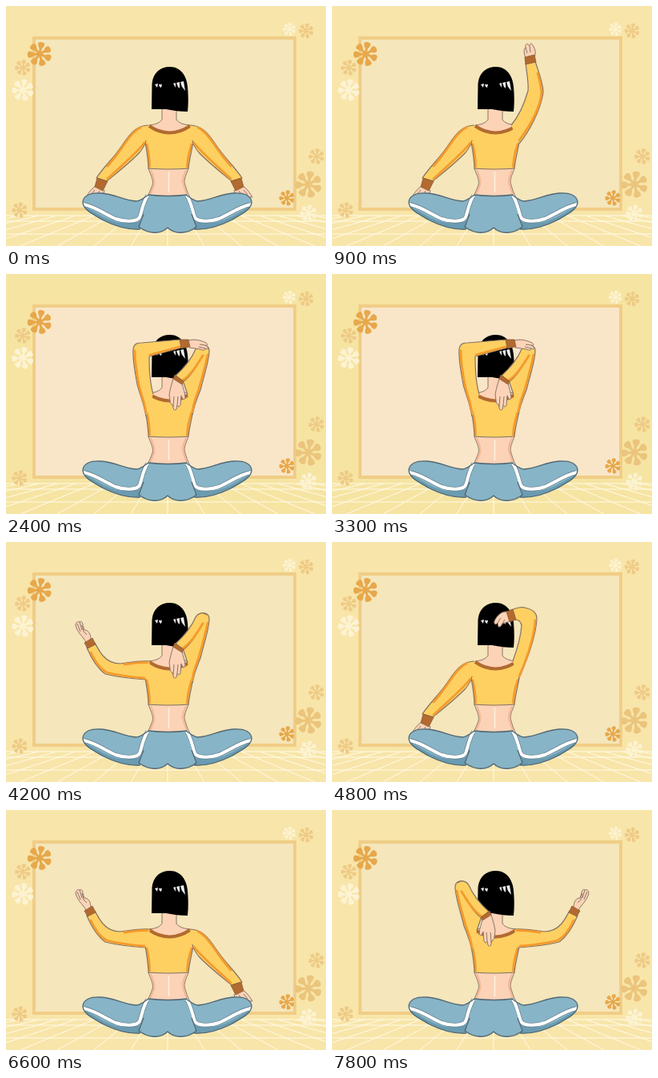
An HTML page for the animation above (8000 ms loop, 400 px wide and 300 px high).

```html
<!DOCTYPE html>
<html lang="en">
<head>
<meta charset="utf-8">
<title>Shoulder stretch</title>
<style>
  html, body { margin: 0; width: 100%; height: 100%; overflow: hidden; background: #f8e5a9; }
  svg { display: block; width: 100%; height: 100%; }
  path { stroke-linejoin: round; }
  .wall { fill: #f8e5a9; }
  .panel { fill: #f5e6bb; stroke: #f0cd86; stroke-width: 4; }
  .warm .wall { fill: #f6e4a2; }
  .warm .panel { fill: #f9e6c8; }
  .floor { fill: none; stroke: #fffbe9; stroke-width: 1; }
  .sleeve, .top { fill: #fdd061; }
  .sleeve, .edge { stroke: #857264; stroke-width: 1.2; }
  .edge, .shade, .line, .blush { fill: none; }
  .shade { stroke: #f59a2c; stroke-width: 2.8; stroke-linecap: round; }
  .cuff { fill: #b26a30; stroke: #8a5a38; stroke-width: .8; }
  .skin { fill: #fcd3b7; stroke: #8b7668; stroke-width: 1; }
  .line { stroke: #8b7668; stroke-width: 1; }
  .blush { stroke: #f3b796; stroke-width: 2; }
  .leg, .seat { fill: #87b4c6; }
  .under { fill: #6a9bb0; }
  .rim { fill: none; stroke: #526874; stroke-width: 1.3; }
  .hem { fill: none; stroke: #64808f; stroke-width: 5.4; }
  .stripe { fill: none; stroke: #fff; stroke-width: 4; }
</style>
</head>
<body>
<svg id="stage" viewBox="0 0 400 300" preserveAspectRatio="none">
  <defs>
    <path id="petal" d="M-1.300 0 L-1.600 -7 Q-5 -11 -3.800 -14 Q0 -16.500 3.800 -14 Q5 -11 1.600 -7 L1.300 0Z"/>
    <g id="flower"><circle r="3.500"/></g>

    <!-- Left arm poses; the right arm mirrors them -->
    <g id="down">
      <path class="skin" d="M112 225 C106 229 103 234 100 239 L121 239 L123 230"/>
      <path class="line" d="M111 230 L106 236 M117 231 L113 237"/>
      <path class="sleeve" d="M178 149 C164 149 156 158 146 173 C135 190 122 201 113 215 L126 219 C138 209 157 194 167 183 C171 178 174 173 175 168"/>
      <path class="shade" d="M168 152 C156 158 148 174 137 188 L127 200 M173 171 C163 184 145 199 127 216"/>
      <path class="cuff" d="M114 215 L127 219 L121 231 L111 226Z"/>
    </g>
    <g id="out">
      <path class="skin" d="M100 125 C96 118 89 113 87 104 C87 100 90 99 92 100 C94 98 96 101 96 104 L98 110 C103 110 106 115 106 122"/>
      <path class="line" d="M89 102 L93 112 M92 100 L95 110 M95 104 L97 112 L101 116"/>
      <path class="sleeve" d="M180 149 C166 148 152 151 143 152 C134 152 127 149 121 142 C116 136 114 131 111 126 L101 132 C106 144 113 157 124 165 C140 169 160 171 175 172"/>
      <path class="shade" d="M106 138 C112 151 118 159 126 163 C142 167 158 169 173 170 M177 150.500 Q162 150.500 148 153"/>
      <path class="cuff" d="M98 126 L108 120 L112 128 L102 133Z"/>
    </g>
    <g id="up">
      <path class="skin" d="M155 64 C152 57 155 53 157 49 C159 45 161 48 161 50 C164 45 167 48 166 52 C169 54 168 59 166 66"/>
      <path class="line" d="M161 50 L160 58 M166 52 L164 59"/>
      <path class="sleeve" d="M174 172 C162 158 147 130 144 108 C144 96 150 82 154 69 L166 72 C164 86 162 98 163 106 C167 120 174 137 184 149"/>
      <path class="shade" d="M174 168 C162 152 148 129 146 108 Q147 97 151 84"/>
      <path class="cuff" d="M153 70 L155 61 L167 64 L166 73Z"/>
    </g>
    <g id="bent">
      <path class="skin" d="M188 87 C196 86 202 92 205 99 C206 103 203 104 201 101 L200 106 Q197 107 195 102 L185 99"/>
      <path class="line" d="M201 101 L197 95 M195 102 L192 97"/>
      <path class="sleeve" d="M175 172 C163 145 153 115 152 96 C152 88 158 84 164 83 C170 80 176 82 184 85 L179 97 C175 97 172 100 171 104 C172 120 178 138 182 149"/>
      <path class="shade" d="M174 168 C163 142 155 115 154 98"/>
      <path class="cuff" d="M182 84 L190 87 L186 100 L178 97Z"/>
    </g>
    <g id="behind">
      <path class="sleeve" d="M175 176 C172 160 168 153 165 145 C160 125 154 108 154 96 C154 90 160 87 166 90 L188 130 L181 151"/>
      <path class="shade" d="M175 172 C173 158 169 151 167 144 Q160 120 156 101"/>
      <path class="skin" d="M188 136 C187 143 184 148 184 155 C185 158 187 157 189 152 L190 164 Q192 168 194 164 L195 169 Q198 172 199 167 L200 163 Q203 163 203 158 L204 151 C203 144 201 138 199 131"/>
      <path class="line" d="M194 164 L193 153 M199 166 L198 153"/>
      <path class="sleeve" d="M157 91 C162 87 168 89 171 94 C177 108 186 118 196 127 L187 135 C177 128 169 114 161 101"/>
      <path class="shade" d="M162 102 C170 115 177 126 187 133"/>
      <path class="cuff" d="M197 126 L186 134 L188 138 L199 131Z"/>
    </g>
    <g id="over">
      <path class="skin" d="M228 83 C236 81 244 83 250 86 C253 88 252 90 249 89 L253 92 Q253 95 249 93 Q248 97 243 94 L229 92"/>
      <path class="line" d="M249 89 L242 88 M249 93 L241 91"/>
      <path class="sleeve" d="M175 178 C172 160 167 150 164 138 C161 122 158 106 159 94 C160 87 164 86 170 86 L218 82 L220 92 L179 103 C179 120 180 137 184 150"/>
      <path class="shade" d="M175 173 C173 159 168 149 166 138 Q161 112 161 96 M180 101 L217 91"/>
      <path class="cuff" d="M217 82 L228 82 L230 91 L219 93Z"/>
    </g>

    <g id="leg">
      <path class="leg" d="M178 236 C172 240 168 244 163 244 C148 243 135 235 119 234 C105 233 96 237 96 246 C97 255 110 261 122 268 C138 276 153 280 168 279 L181 270"/>
      <path class="under" d="M97 250 C112 257 126 269 143 271 Q156 272 168 269 L168 279 C153 280 138 276 122 268 C110 261 99 257 97 250Z"/>
      <path class="hem" d="M98 248 C112 251 123 260 137 266 C148 270 164 270 167 264 C170 256 171 246 177 237"/>
      <path class="stripe" d="M97 248 C112 251 123 260 137 266 C148 270 164 270 167 264 C170 256 171 246 177 237"/>
      <path class="rim" d="M178 236 C172 240 168 244 163 244 C148 243 135 235 119 234 C105 233 96 237 96 246 C97 255 110 261 122 268 C138 276 153 280 168 279"/>
    </g>
  </defs>

  <rect class="wall" width="400" height="300"/>
  <path class="floor" d="M0 262 H400 M0 269 H400 M0 285 H400"/>
  <path class="floor" id="rays"/>
  <rect class="panel" x="35" y="40" width="326" height="214"/>
  <g id="flowers"></g>

  <path class="skin" d="M178 203 C180 210 185 217 183 224 Q180 232 176 240 H230 Q226 232 224 224 C221 217 226 210 228 203Z"/>
  <path class="blush" d="M181 205 C183 211 187 217 185 224 L180 236 M225 205 C223 211 219 217 222 224 L226 236"/>
  <path d="M203.500 207 V233" stroke="#fff1df" stroke-width="1.500"/>
  <path class="top" d="M176 149 L174 170 C176 182 178 192 178 203 Q203 205 228 203 C229 192 232 182 234 170 L232 149Z"/>
  <path class="shade" d="M176 173 Q179.500 188 179.500 201 M232 173 Q227 188 226.500 201"/>
  <path class="edge" d="M174 170 C176 182 178 192 178 203 Q203 205 228 203 C229 192 232 182 234 170"/>
  <path class="skin" d="M195 127 L195 142 Q191 148 179 149 Q204 168 230 149 Q217 148 213 142 L213 127Z"/>
  <path d="M179 150 Q204 167 230 150" fill="none" stroke="#b26a30" stroke-width="4"/>

  <path d="M182 129 L182.500 97 C184 83 193 76 205 76 C218 76 226 87 227 101 C228 113 228 122 227 132 C218 132 210 131 200 129Z"/>
  <path fill="#eee" d="M186 98 L190 97 L189 102Z M191 98 L195 98 L194 102 L192 101Z M209 97 L212 96 L212 102Z M213 96 L217 95 L217 103 L215 101Z M218 95 L222 94 L224 106 L220 101Z"/>

  <use id="right" href="#down" transform="translate(408) scale(-1 1)"/>
  <use id="left" href="#down"/>

  <path class="seat" d="M178 236 Q203 239 226 236 L238 275 Q221 289 202 278 Q184 289 167 275Z"/>
  <use href="#leg"/>
  <use href="#leg" transform="translate(403) scale(-1 1)"/>
  <path class="seat" d="M180 239 Q203 241 223 239 Q230 248 232 258 L238 275 C227 285 211 286 202 277 C193 286 178 285 167 276 L172 258 Q174 248 180 239Z"/>
  <path class="rim" d="M178 236 Q203 239 226 236 M172 260 L166 276 C178 285 193 286 202 277 C211 286 227 285 238 276 L232 260"/>
</svg>
<script>
  const get = id => document.getElementById(id);
  const stage = get("stage");

  const rays = [];
  for (let i = -14; i <= 14; i++) rays.push(`M${202 + i * 23} 262 L${202 + i * 46} 300`);
  get("rays").setAttribute("d", rays.join(""));

  const PETALS = 7;
  for (let i = 0; i < PETALS; i++) {
    get("flower").innerHTML += `<use href="#petal" transform="rotate(${10 + i * 360 / PETALS})"/>`;
  }

  const pale = "#fcf3d3", sand = "#eecb86", gold = "#e7a84b";
  const flowers = [
    [42, 60, 1, gold], [21, 77, .65, sand], [21, 105, .9, pale],
    [354, 29, .54, pale], [375, 31, .62, sand], [388, 188, .65, sand],
    [378, 223, 1.1, "#ebc57d"], [351, 240, .64, gold],
    [378, 259, .7, pale], [17, 255, .64, sand]
  ];
  get("flowers").innerHTML = flowers.map(([x, y, size, color]) =>
    `<use href="#flower" fill="${color}" transform="translate(${x} ${y}) scale(${size})"/>`).join("");

  const STEP = 300, LOOP = 8000, HALF = 20;
  const lead = ["down", "out", "up", "bent", "behind", "behind", "behind", "behind"];
  const follow = ["down", "down", "down", "down", "down", "out", "up", "over"];

  // Rise one pose per step, hold the stretch, then unwind; sides swap each half.
  function draw(time) {
    const step = Math.floor(time % LOOP / STEP);
    const beat = step % HALF;
    const pose = Math.max(0, Math.min(7, beat - 1, HALF - 1 - beat));
    const swap = step >= HALF;
    get("right").setAttribute("href", "#" + (swap ? follow : lead)[pose]);
    get("left").setAttribute("href", "#" + (swap ? lead : follow)[pose]);
    stage.classList.toggle("warm", pose === 7);
  }

  const start = performance.now();
  function tick() {
    draw(performance.now() - start);
    requestAnimationFrame(tick);
  }
  tick();
</script>
</body>
</html>
```
